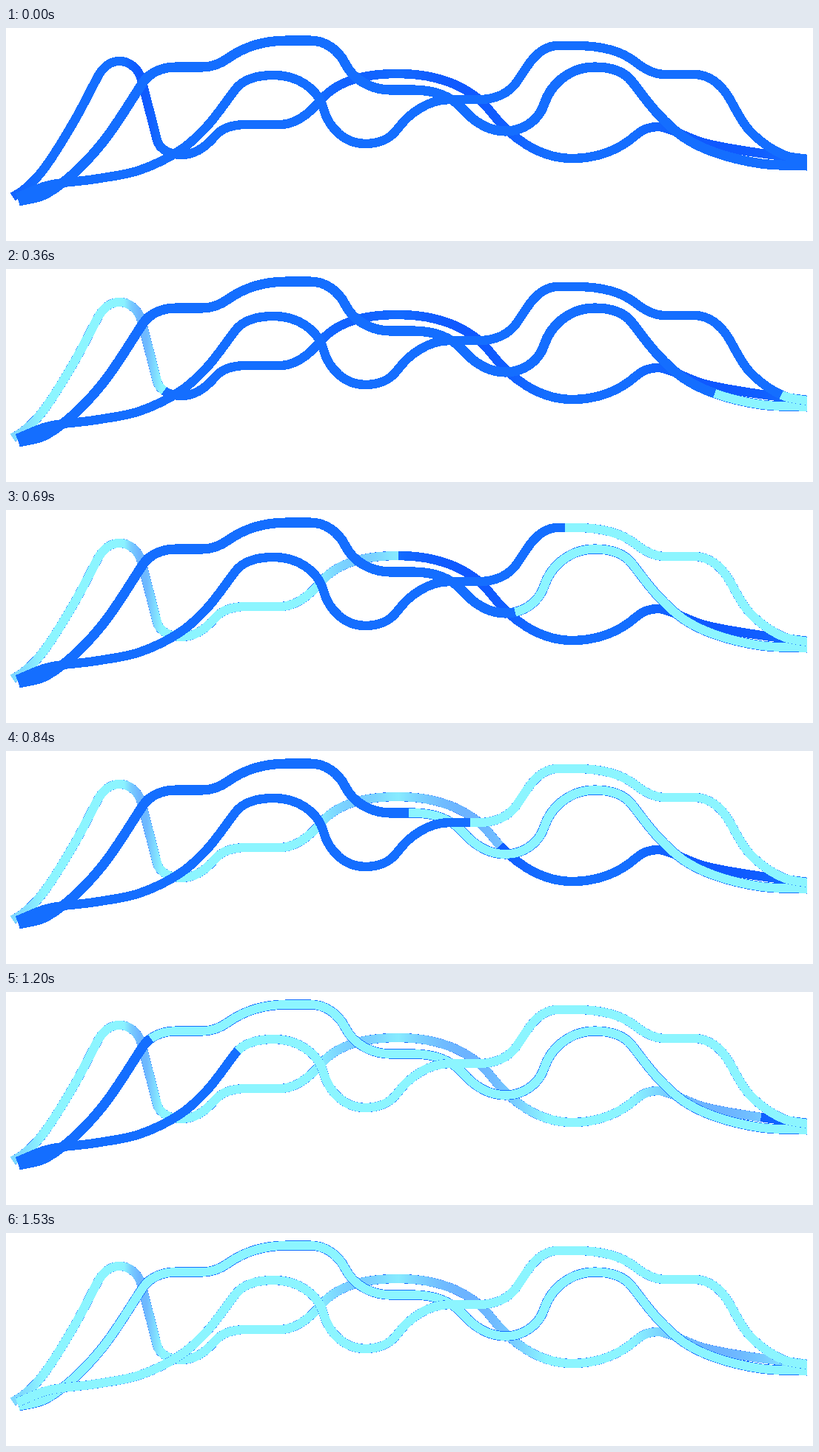
Write an HTML page that moves like this. It is 1090 px wide and 289 px high and loops after 1.86 s.

```html
<!DOCTYPE html>
<html lang="en">
<head>
<meta charset="utf-8">
<title>Ropes</title>
<style>
  html, body { margin: 0; width: 100%; height: 100%; overflow: hidden; background: #fff; }
  svg { display: block; width: 1090px; height: 289px; }
  path { fill: none; stroke-linejoin: round; shape-rendering: crispEdges; }
</style>
</head>
<body>
<svg viewBox="0 0 1090 289">
  <defs>
    <linearGradient id="deep" gradientUnits="userSpaceOnUse" x1="0" x2="1090" y1="0" y2="0"></linearGradient>
    <linearGradient id="pale" gradientUnits="userSpaceOnUse" x1="0" x2="1090" y1="0" y2="0"></linearGradient>
    <clipPath id="edge"><rect width="1082" height="289"/></clipPath>
  </defs>
  <g id="ropes" clip-path="url(#edge)"></g>
</svg>
<script>
const NS = 'http://www.w3.org/2000/svg';
const LOOP = 1860, STEP = 30;
const BLUE = [20, 110, 255], NAVY = [14, 86, 255];
const CYAN = [140, 245, 255], SKY = [104, 172, 255];
const rgb = color => `rgb(${color})`;

// Key points are the crests, dips and flanks of each rope, left to right.
const ropes = [
  {
    points: '9,229 22,221 45,199 90,130 124,66 153,45 183,70 204,152 238,172 283,146 325,131 ' +
      '370,131 425,98 530,62 655,114 765,177 850,146 880,134 905,141 940,155 1000,167 1083,178',
    begin: 0, end: 1260, leftward: false,
    base: 'url(#deep)', lit: 'url(#pale)', width: 12.4, litWidth: 12
  },
  {
    points: '17,235 50,227 85,203 130,156 185,74 230,53 265,53 300,41 380,17 411,17 458,48 ' +
      '520,84 550,84 617,110 675,140 727,103 795,53 845,72 880,116 915,148 955,168 1020,184 1083,187',
    begin: 240, end: 1440, leftward: true,
    base: rgb(BLUE), lit: rgb(CYAN), width: 13.2, litWidth: 11.8
  },
  {
    points: '15,230 55,214 120,205 180,193 235,166 270,135 310,83 362,64 429,110 485,157 528,138 ' +
      '600,97 640,97 690,73 704,52 745,24 770,24 850,46 890,63 930,63 975,92 1005,140 1050,172 1083,179',
    begin: 325, end: 1530, leftward: true,
    base: rgb(BLUE), lit: rgb(CYAN), width: 12.4, litWidth: 12
  }
];

function add(parent, tag, attrs) {
  const node = document.createElementNS(NS, tag);
  for (const key in attrs) node.setAttribute(key, attrs[key]);
  return parent.appendChild(node);
}

// The back rope darkens in soft bumps where it turns away from the light.
const bumps = [
  { x: 8, reach: 40, depth: .4 },
  { x: 183, reach: 24, depth: .9 },
  { x: 475, reach: 60, depth: .55 },
  { x: 625, reach: 105, depth: .9 },
  { x: 960, reach: 115, depth: .9 }
];
function shadeAt(x) {
  const shades = bumps.map(b => b.depth * Math.cos(Math.min(1, Math.abs(x - b.x) / b.reach) * Math.PI / 2));
  return Math.max(...shades);
}
const mix = (from, to, k) => rgb(from.map((c, i) => Math.round(c + (to[i] - c) * k)));
for (let x = 0; x <= 1090; x += 10) {
  add(deep, 'stop', { offset: x / 1090, 'stop-color': mix(BLUE, NAVY, shadeAt(x)) });
  add(pale, 'stop', { offset: x / 1090, 'stop-color': mix(CYAN, SKY, shadeAt(x)) });
}

// Joins key points with near-circular arcs: crests and plateaus are level,
// and a flank between two level points is as steep as both chords added.
function ropePath(text) {
  const points = text.split(' ').map(pair => pair.split(',').map(Number));
  const last = points.length - 1;
  const chord = i => Math.atan2(points[i + 1][1] - points[i][1], points[i + 1][0] - points[i][0]);
  const level = i => i > 0 && i < last && chord(i - 1) * chord(i) <= 0;
  const angles = points.map((_, i) => {
    if (level(i)) return 0;
    const chords = [];
    if (i > 0 && !level(i - 1)) chords.push(chord(i - 1));
    if (i < last && !level(i + 1)) chords.push(chord(i));
    if (!chords.length) return chord(i - 1) + chord(i);
    return chords.reduce((a, b) => a + b) / chords.length;
  });

  let d = `M${points[0]}`;
  for (let i = 0; i < last; i++) {
    const [x0, y0] = points[i], [x1, y1] = points[i + 1];
    const a = angles[i], b = angles[i + 1];
    const handle = Math.hypot(x1 - x0, y1 - y0) / (3 * Math.cos((b - a) / 4) ** 2);
    d += `C${x0 + handle * Math.cos(a)},${y0 + handle * Math.sin(a)} ` +
      `${x1 - handle * Math.cos(b)},${y1 - handle * Math.sin(b)} ${x1},${y1}`;
  }
  return d;
}

const layer = document.getElementById('ropes');
for (const rope of ropes) {
  const d = ropePath(rope.points);
  add(layer, 'path', { d, stroke: rope.base, 'stroke-width': rope.width });
  rope.path = add(layer, 'path', { d, stroke: rope.lit, 'stroke-width': rope.litWidth, pathLength: 1 });
}

function draw(now) {
  const time = Math.floor((now % LOOP) / STEP) * STEP;
  for (const { path, begin, end, leftward } of ropes) {
    const share = Math.max(0, Math.min(1, (time - begin) / (end - begin)));
    path.style.visibility = share > 0 ? 'visible' : 'hidden';
    path.setAttribute('stroke-dasharray', `${share} 2`);
    path.setAttribute('stroke-dashoffset', leftward ? share - 1 : 0);
  }
}

let start;
function tick(now) {
  start ??= now;
  draw(Math.max(0, now - start));
  requestAnimationFrame(tick);
}
draw(0);
requestAnimationFrame(tick);
</script>
</body>
</html>
```
